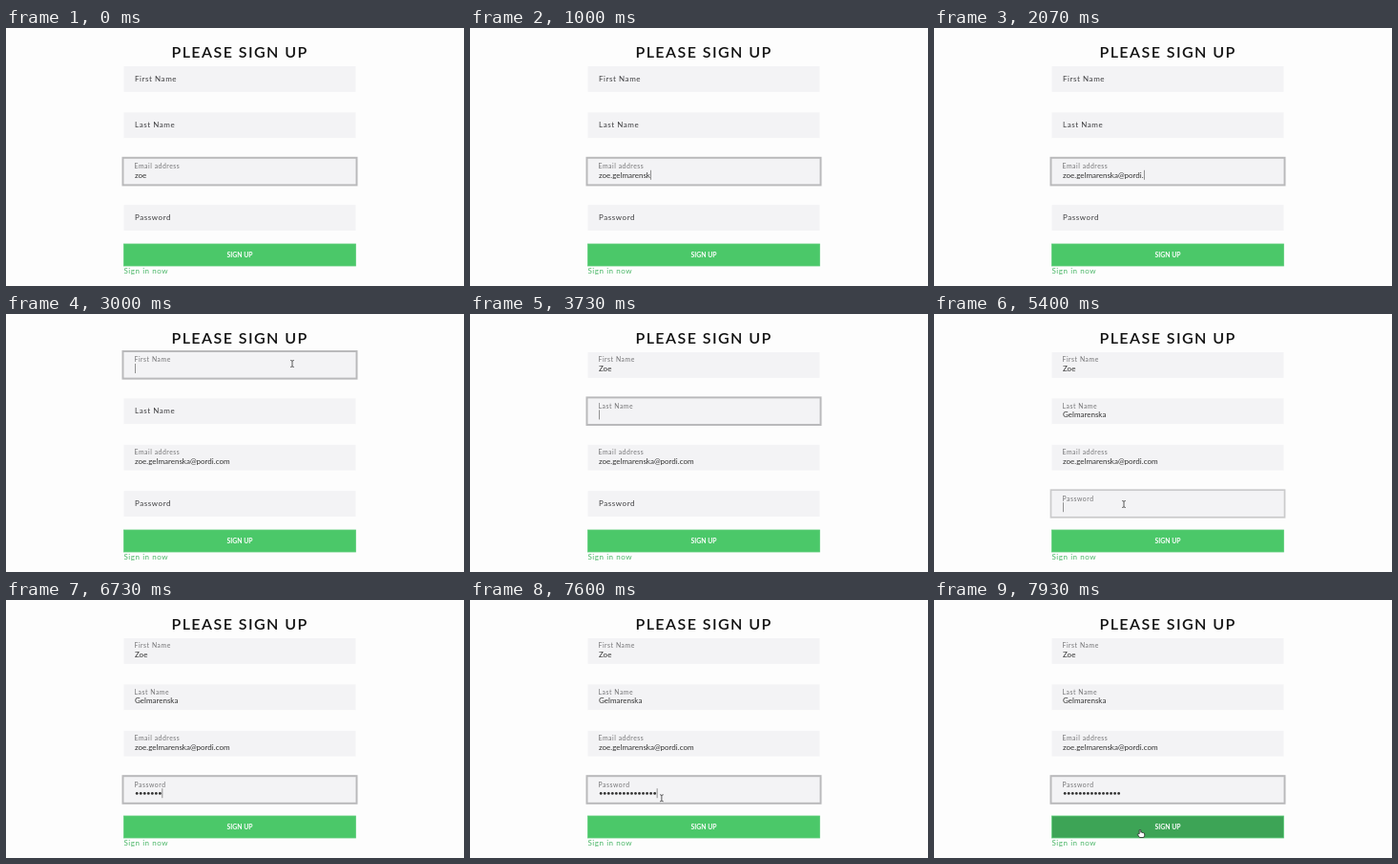
An HTML page that plays this animation: 480 px wide and 270 px high, repeating every 8 s.

```html
<!DOCTYPE html>
<html lang="en">
<head>
<meta charset="utf-8">
<title>Sign up form</title>
<style>
html, body { margin: 0; width: 100%; height: 100%; overflow: hidden; background: #fdfdfd; }
svg { display: block; width: 480px; height: 270px; font: 8px Lato, "Open Sans", sans-serif; }
</style>
</head>
<body>
<svg id="stage" viewBox="0 0 480 270"></svg>
<script>
const TICKS = 120, RATE = 15; // the screen updates 15 times a second
const stage = document.getElementById('stage');
const pen = document.createElement('canvas').getContext('2d');
pen.font = '80px Lato, "Open Sans", sans-serif';
const textWidth = s => pen.measureText(s).width / 10;

const LEFT = 123.5, WIDTH = 243, HEIGHT = 26.8, TEXT_X = 135, DOT_STEP = 4.03;
const fieldTop = i => 40 + 48.4 * i;

// Each burst types `count` characters evenly between two ticks.
const burst = (from, to, count) => ({ from, to, count });
const fields = [
  { label: 'First Name', on: 41, off: 53, text: 'Zoe', bursts: [burst(48, 51, 3)] },
  { label: 'Last Name', on: 53, off: 79, text: 'Gelmarenska',
    bursts: [burst(59, 62, 2), burst(63, 65, 3), burst(67, 72, 6)] },
  { label: 'Email address', on: -20, off: 41, text: 'zoe.gelmarenska@pordi.com',
    bursts: [burst(-10, -8, 3), burst(1, 2, 4), burst(4, 16, 8), burst(20, 23, 2), burst(25, 28, 4), burst(31, 33, 4)] },
  { label: 'Password', on: 79, off: TICKS, secret: true,
    bursts: [burst(87, 92, 4), burst(95, 98, 2), burst(101, 104, 3), burst(106, 107, 2), burst(109, 111, 4)] }
];

// The pointer travels between two points, then hides when typing starts.
const trips = [
  { start: 36, arrive: 43, hide: 48, from: [345, 213], to: [300, 52] },
  { start: 75, arrive: 79, hide: 87, from: [280, 100], to: [199, 199] },
  { start: 113, arrive: 118, hide: TICKS, from: [199, 203], to: [217, 244] }
];

const lerp = (a, b, p) => a + (b - a) * p;
const ramp = (t, from, to) => {
  const p = Math.min(1, Math.max(0, (t - from) / (to - from)));
  return p * p * (3 - 2 * p);
};
const mix = (a, b, p) => `rgb(${a.map((v, i) => Math.round(lerp(v, b[i], p)))})`;
const rect = (x, y, w, h, style) => `<rect x="${x}" y="${y}" width="${w}" height="${h}" ${style}/>`;
const text = (x, y, s, style) => `<text x="${x}" y="${y}" ${style}>${s}</text>`;

const typedBy = (b, t) => t < b.from ? 0
  : 1 + Math.floor((b.count - 1) * (Math.min(t, b.to) - b.from) / (b.to - b.from));

function field(f, top, t) {
  const n = f.bursts.reduce((sum, b) => sum + typedBy(b, t), 0);
  const up = ramp(t, f.on, f.on + 2);
  const ring = ramp(t, f.on, f.on + 3) * (1 - ramp(t, f.off, f.off + 2));
  let out = rect(LEFT, top, WIDTH, HEIGHT, 'fill="#f3f3f5"');
  if (ring > 0) {
    out += rect(LEFT - 1, top - 1, WIDTH + 2, HEIGHT + 1.8,
      `fill="none" stroke="#b9b9bb" stroke-width="${lerp(1, 2, ring)}" opacity="${ring}"`);
  }
  out += text(lerp(TEXT_X, 134.5, up), top + lerp(16, 10.3, up), f.label,
    `font-size="${lerp(8, 6.8, up)}" letter-spacing=".56" fill="${mix([62, 62, 64], [116, 116, 118], up)}"`);

  let caretX = TEXT_X + .3;
  if (f.secret) {
    for (let i = 0; i < n; i++) {
      out += `<circle cx="${137.2 + i * DOT_STEP}" cy="${top + 17.2}" r="1.4" fill="#333"/>`;
    }
    caretX += n * DOT_STEP;
  } else {
    const shown = f.text.slice(0, n);
    out += text(TEXT_X, top + 20, shown, 'fill="#333"');
    caretX += textWidth(shown);
  }
  const past = f.bursts.filter(b => b.from <= t).map(b => Math.min(t, b.to));
  const idle = t - Math.max(f.on, ...past);
  if (t >= f.on && t < f.off && idle % RATE < RATE / 2) {
    out += rect(caretX, top + 12, .7, 10, 'fill="#666"');
  }
  return out;
}

const shapes = {
  beam: '<path d="M-1.8-3.5Q0-3.5 0-2.5Q0-3.5 1.8-3.5M0-2.5V2.5M-1.8 3.5Q0 3.5 0 2.5Q0 3.5 1.8 3.5" fill="none" stroke="#333" stroke-width=".8"/>',
  arrow: '<path d="M0 0V8L1.9 6.3L3.1 9L4.3 8.5L3.1 5.8H5.6Z" fill="#111" stroke="#fff" stroke-width=".6"/>',
  hand: '<path d="M-1.8.8V-3.2Q-1-4.3-.2-3.2V-.8Q.8-1.3 1.3-.5Q2.2-.8 2.6 0Q3.7-.1 3.7 1V2.4L2.8 4.5H-1.5L-3.6 1.6Q-3.5.3-2.4.8Z" fill="#fff" stroke="#222" stroke-width=".8"/>'
};

function pointer(t) {
  const trip = trips.find(r => t >= r.start && t < r.hide);
  if (!trip) return '';
  const p = ramp(t, trip.start, trip.arrive);
  const [x, y] = trip.from.map((v, i) => lerp(v, trip.to[i], p));
  const inField = fields.some((f, i) => y >= fieldTop(i) && y <= fieldTop(i) + HEIGHT);
  const kind = inField ? 'beam' : y >= 226 && y <= 249 ? 'hand' : 'arrow';
  return `<g transform="translate(${x} ${y})">${shapes[kind]}</g>`;
}

function scene(t) {
  const green = mix([75, 200, 105], [61, 164, 86], ramp(t, 115, 118));
  return text(245.1, 30.9, 'PLEASE SIGN UP',
      'text-anchor="middle" font-size="16" font-weight="600" letter-spacing="1.45" fill="#111"')
    + fields.map((f, i) => field(f, fieldTop(i), t)).join('')
    + rect(LEFT, 226, WIDTH, 23, `fill="${green}" stroke="#5fce7b" stroke-width=".8"`)
    + text(245, 239.7, 'SIGN UP', 'text-anchor="middle" font-size="6.8" font-weight="700" fill="#fff"')
    + text(LEFT, 257, 'Sign in now', 'letter-spacing=".55" fill="#49b666"')
    + pointer(t);
}

let last = -1;
const start = performance.now();
function frame() {
  const t = Math.floor((performance.now() - start) / 1000 * RATE + .06) % TICKS;
  if (t !== last) stage.innerHTML = scene(last = t);
  requestAnimationFrame(frame);
}
frame();
</script>
</body>
</html>
```
